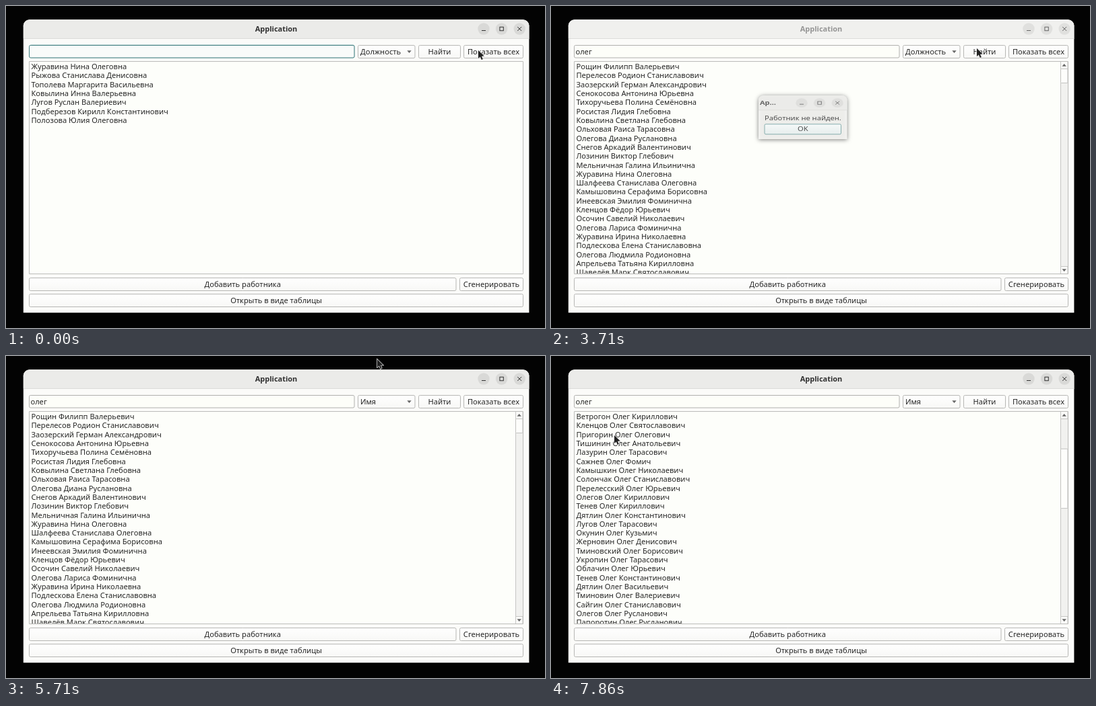
An HTML page with a canvas that plays this animation: 800 by 479 pixels, repeating every 8000 ms.

```html
<!DOCTYPE html>
<html lang="ru">
<head>
<meta charset="utf-8">
<title>Application</title>
<style>
html, body { margin: 0; width: 800px; height: 479px; overflow: hidden; background: #030303; }
canvas { display: block; }
</style>
</head>
<body>
<canvas id="stage" width="800" height="479"></canvas>
<script>
const c = document.getElementById('stage').getContext('2d');
const FONT = '11.1px "Noto Sans", "Open Sans", sans-serif';
const BOLD = 'bold 11px "Noto Sans", "Open Sans", sans-serif';
const ROW = 13.32, LOOP = 8000;

const few = `Журавина Нина Олеговна
Рыжова Станислава Денисовна
Тополева Маргарита Васильевна
Ковылина Инна Валерьевна
Лугов Руслан Валериевич
Подберезов Кирилл Константинович
Полозова Юлия Олеговна`.split('\n');

const all = `Рощин Филипп Валерьевич
Перелесов Родион Станиславович
Заозерский Герман Александрович
Сенокосова Антонина Юрьевна
Тихоручьева Полина Семёновна
Росистая Лидия Глебовна
Ковылина Светлана Глебовна
Ольховая Раиса Тарасовна
Олегова Диана Руслановна
Снегов Аркадий Валентинович
Лозинин Виктор Глебович
Мельничная Галина Ильинична
Журавина Нина Олеговна
Шалфеева Станислава Олеговна
Камышовина Серафима Борисовна
Инеевская Эмилия Фоминична
Кленцов Фёдор Юрьевич
Осочин Савелий Николаевич
Олегова Лариса Фоминична
Журавина Ирина Николаевна
Подлескова Елена Станиславовна
Олегова Людмила Родионовна
Апрельева Татьяна Кирилловна
Щавелёв Марк Святославович`.split('\n');

// Surname and patronymic; the shared first name goes between them.
const found = `Березняк Альбертович,Лесовой Валерьевич,Озёркин Константинович,Долинный Денисович,
Подлесков Рустамович,Грачин Филиппович,Полевин Борисович,Рябчин Николаевич,Лугов Павлович,
Ежков Николаевич,Солодин Семёнович,Тенев Николаевич,Ветрогон Кириллович,Кленцов Святославович,
Пригорин Олегович,Тишинин Анатольевич,Лазурин Тарасович,Сажнев Фомич,Камышкин Николаевич,
Солончак Станиславович,Перелесский Юрьевич,Олегов Кириллович,Тенев Кириллович,
Дятлин Константинович,Лугов Тарасович,Окунин Кузьмич,Жерновин Денисович,Тминовский Борисович,
Укропин Тарасович,Облачин Юрьевич,Тенев Константинович,Дятлин Васильевич,Тминовин Валериевич,
Сайгин Станиславович,Олегов Русланович,Папоротин Русланович`
  .split(/,\s*/).map(n => n.replace(' ', ' Олег '));

const fields = ['Имя', 'Фамилия', 'Отчество', 'Возраст', 'Зарплата', 'Должность'];

// Pointer path: step, x, y
const path = [
  [0, 701, 66], [8, 75, 71], [21, 75, 71], [25, 632, 63], [26, 632, 63],
  [29, 375, 185], [30, 375, 185], [34, 602, 64], [35, 602, 64], [38, 551, 5],
  [40, 551, 5], [42, 636, 66], [43, 636, 66], [46, 190, 150], [48, 124, 122],
  [49, 122, 118], [50, 94, 118]
];

function pointerAt(n) {
  const i = path.findIndex(p => p[0] > n);
  if (i < 0) return path.at(-1).slice(1);
  const [a, x, y] = path[i - 1], [b, x2, y2] = path[i];
  let k = (n - a) / (b - a);
  k = k * k * (3 - 2 * k);
  return [x + (x2 - x) * k, y + (y2 - y) * k];
}

function rect(x, y, w, h, fill) {
  c.fillStyle = fill;
  c.fillRect(x, y, w, h);
}

function box(x, y, w, h, fill, stroke, r = 2) {
  c.beginPath();
  c.roundRect(x, y, w, h, r);
  c.fillStyle = fill;
  c.fill();
  if (stroke) {
    c.strokeStyle = stroke;
    c.lineWidth = 1;
    c.stroke();
  }
}

function text(s, x, y, color = '#262626', align = 'left', font = FONT) {
  c.font = font;
  c.textAlign = align;
  c.fillStyle = color;
  c.fillText(s, x, y + 4);
}

function line(color, ...pts) {
  c.beginPath();
  pts.forEach(([x, y], i) => i % 2 ? c.lineTo(x, y) : c.moveTo(x, y));
  c.strokeStyle = color;
  c.lineWidth = 1;
  c.stroke();
}

function triangle(x, y, dir) {
  c.beginPath();
  c.moveTo(x - 3.2, y - 1.7 * dir);
  c.lineTo(x + 3.2, y - 1.7 * dir);
  c.lineTo(x, y + 1.9 * dir);
  c.fillStyle = '#666';
  c.fill();
}

function shade(y, from, to) {
  const g = c.createLinearGradient(0, y, 0, y + 19);
  g.addColorStop(0, from);
  g.addColorStop(1, to);
  return g;
}

function button(label, x, y, w, fill = shade(y, '#fff', '#f8f8f6'), stroke = '#b7b7b5', ink = '#262626') {
  box(x + .5, y + .5, w - 1, 19, fill, stroke);
  text(label, x + w / 2, y + 10, ink, 'center');
}

function titleButtons(x, y, disc, ink) {
  for (let i = 0; i < 3; i++) {
    c.beginPath();
    c.arc(x + i * 26.6, y, 8.7, 0, 7);
    c.fillStyle = disc;
    c.fill();
  }
  line(ink, [x - 3, y + 2.5], [x + 3, y + 2.5]);
  c.strokeRect(x + 23.9, y - 2.7, 5.4, 5.4);
  const u = x + 53.2;
  line(ink, [u - 3, y - 3], [u + 3, y + 3], [u - 3, y + 3], [u + 3, y - 3]);
}

function windowFrame(active) {
  const top = [9, 9, 0, 0];
  box(25.8, 20.3, 750.6, 436, '#fbfbf9', null, top);
  box(25.8, 20.3, 750.6, 28.2, active ? '#ebebe9' : '#f0f0ee', null, top);
  rect(26, 48, 750.4, 1, '#dcdcda');
  text('Application', 401, 34, active ? '#303030' : '#959595', 'center', BOLD);
  titleButtons(709, 34, active ? '#d9d9d7' : '#e0e0de', active ? '#333' : '#666');
}

function searchField(n) {
  const focus = n < 1 || n >= 8 && n < 25;
  if (focus) box(34.5, 57.5, 483, 20, '#a9c9c9', null, 3);
  box(34.5, 58.5, 482.5, 18.5, focus ? '#f9fbfa' : '#fdfef9', focus ? '#407e80' : '#b0b0ae');
  const typed = 'олег'.slice(0, n < 17 ? 0 : n < 18 ? 2 : 4);
  text(typed, 36.5, 68);
  const caret = n >= 8 && n < 12 || n >= 16 && n < 22;
  if (caret) rect(Math.round(37 + c.measureText(typed).width), 61, 1, 14, '#111');
}

function list(n) {
  const rows = n < 1 ? few : n < 43 ? all : found;
  const top = n < 52 ? 0 : 3 * (n - 51);
  c.save();
  box(34.5, 82.5, 733, 316, '#fdfefa', '#bcbcba', 0);
  c.beginPath();
  c.rect(35, 83, 732, 315);
  c.clip();
  if (n >= 48 && top <= 2) rect(35, 83.3 + 2 * ROW, 721, ROW, '#30807f');
  rows.slice(top, top + 24).forEach((name, i) => {
    const selected = n >= 48 && i + top === 2;
    text(name, 37.5, 90 + i * ROW, selected ? '#e6f2f0' : '#262626');
  });
  if (n >= 1) {
    rect(756, 83, 11, 315, '#f1f1ef');
    rect(756, 83, 1, 315, '#c6c6c4');
    const y = n < 43 ? 93.5 : 93.5 + top * 3.72;
    box(756.5, y, 10.5, n < 43 ? 21 : 88.5, '#fdfdfb', '#c2c2c0', 1);
    box(756.5, 82.5, 10.5, 11, '#fafaf8', '#c6c6c4', 0);
    box(756.5, 387.5, 10.5, 11, '#fafaf8', '#c6c6c4', 0);
    triangle(761.7, 88, -1);
    triangle(761.7, 393, 1);
  }
  c.restore();
}

function dialog(n) {
  if (n < 26 || n > 30) return;
  const s = n === 26 ? .79 : n === 30 ? .4 : 1;
  c.save();
  c.globalAlpha = n === 30 ? .4 : n === 26 ? .9 : 1;
  c.translate(0, 165.5);
  c.scale(1, s);
  c.shadowColor = 'rgba(0,0,0,.55)';
  c.shadowBlur = 6;
  c.shadowOffsetY = 1;
  box(308, -41, 131.5, 82, '#f9f9f7', null, [8, 8, 0, 0]);
  c.shadowColor = 'transparent';
  box(308, -41, 131.5, 27, '#ebebe9', null, [8, 8, 0, 0]);
  rect(308, -14, 131.5, 1, '#dadad8');
  text('Ap…', 310, -27, '#555', 'left', BOLD);
  titleButtons(372, -27, '#dededc', '#666');
  text('Работник не найден.', 317, 2, '#3c3c3c');
  button('OK', 316.5, 12.5, 114.5, shade(12.5, '#f6fafa', '#e6eeee'), '#6f9f9f', '#3c3c3c');
  c.restore();
}

function popup(n) {
  if (n < 35 || n > 38) return;
  box(522.5, .5, 84, 82, '#fdfefa', '#b0b0ae', 0);
  const hot = n > 36 ? 0 : 5;
  rect(523, 2 + hot * ROW, 83, ROW, '#30807f');
  fields.forEach((f, i) => text(f, 526, 8.7 + i * ROW, i === hot ? '#fff' : '#262626'));
}

function pointer(n) {
  const [x, y] = pointerAt(n);
  c.save();
  c.translate(x, y);
  if (n >= 7 && x < 517 && y > 58 && y < 77) {
    line('#222', [0, -5], [0, 6], [-2.5, -5], [2.5, -5], [-2.5, 6], [2.5, 6]);
  } else {
    c.beginPath();
    [[0, 0], [0, 12], [2.8, 9.5], [4.8, 14], [6.8, 13], [4.9, 8.8], [8.7, 8.6]]
      .forEach(p => c.lineTo(...p));
    c.closePath();
    c.strokeStyle = '#f0f0f0';
    c.lineWidth = 1.4;
    c.stroke();
    c.fillStyle = '#222';
    c.fill();
  }
  c.restore();
}

function draw(ms) {
  const n = Math.min(55, Math.floor((ms % LOOP + 5) * .007));
  rect(0, 0, 800, 479, '#030303');
  windowFrame(n < 26 || n > 29);
  searchField(n);
  button('', 522, 58, 85.5);
  text(n < 39 ? 'Должность' : 'Имя', 526, 68);
  triangle(598.5, 68, 1);
  button('Найти', 612, 58, 63);
  button('Показать всех', 679, 58, 89);
  list(n);
  button('Добавить работника', 34, 404, 634.5);
  button('Сгенерировать', 673, 404, 95);
  button('Открыть в виде таблицы', 34, 428, 734);
  dialog(n);
  popup(n);
  pointer(n);
}

const start = performance.now();
(function tick() {
  draw(performance.now() - start);
  requestAnimationFrame(tick);
})();
</script>
</body>
</html>
```
